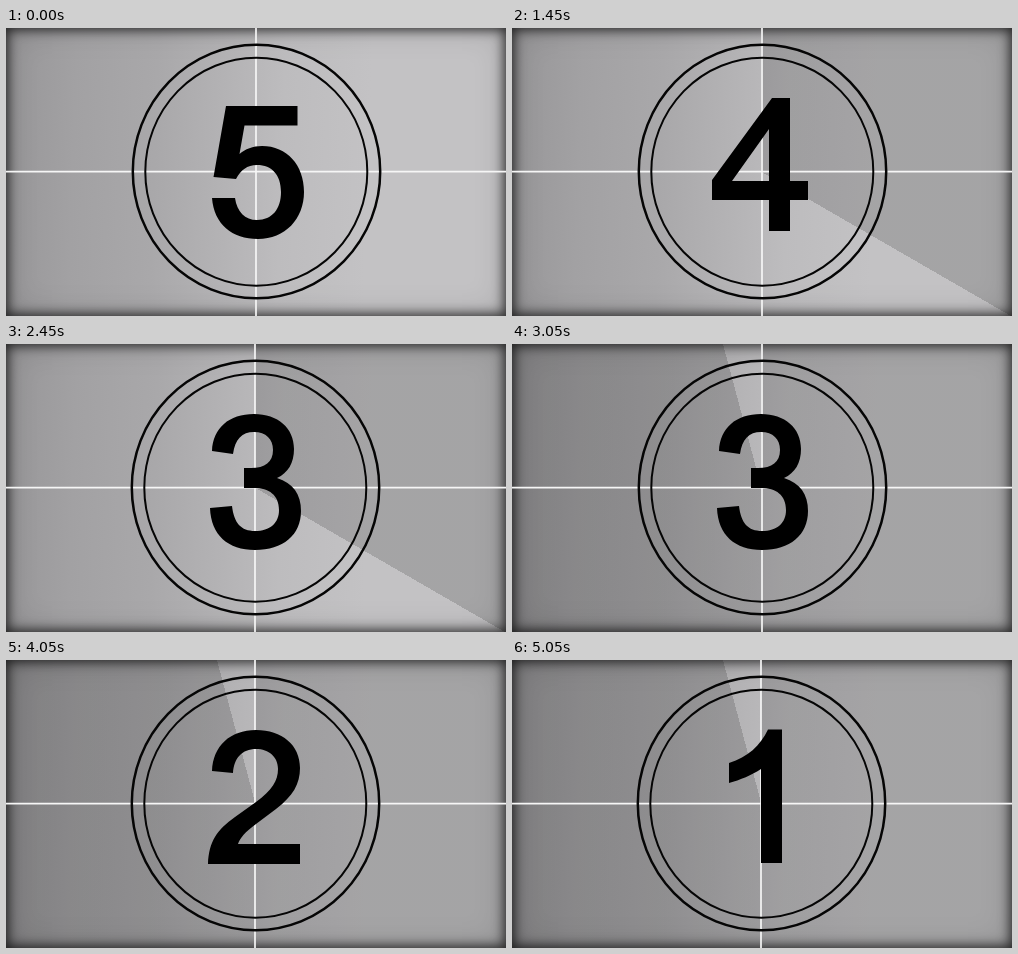
An HTML page that plays this animation: 500 by 288 pixels, repeating every 5.1 s.

```html
<!DOCTYPE html>
<html lang="en">
<head>
<meta charset="utf-8">
<title>Film countdown</title>
<style>
  html, body { margin: 0; width: 100%; height: 100%; overflow: hidden; background: #000; }
  #stage { position: relative; width: 500px; height: 288px; overflow: hidden; }
  #stage > * { position: absolute; inset: 0; }
  .paper {
    background: linear-gradient(92deg, #979698 0, #a2a1a3 14%, #a9a8aa 30%, #b4b3b5 44%, #bdbcbe 55%, #c3c2c4 72%, #c3c2c4 100%);
  }
  .sweep {
    background: conic-gradient(from 0deg at 249.5px 144px, rgba(0, 0, 0, .155) var(--angle, 0deg), transparent 0);
  }
  .vignette {
    box-shadow: inset 0 0 12px 2px rgba(0, 0, 0, .75), inset 0 0 32px rgba(0, 0, 0, .17);
  }
  svg { width: 500px; height: 288px; }
  .ring { fill: none; stroke: #050505; }
  .cross { stroke: #f6f6f6; stroke-width: 1.7; }
</style>
</head>
<body>
<div id="stage">
  <div class="paper"></div>
  <div class="sweep" id="sweep"></div>
  <div class="vignette"></div>
  <svg viewBox="0 0 500 288">
    <path class="cross" d="M0 143.7H500"/>
    <g id="art">
      <path class="cross" d="M250 0V288"/>
      <ellipse class="ring" cx="250.5" cy="143.5" rx="123.7" ry="126.7" stroke-width="2.5"/>
      <ellipse class="ring" cx="250.3" cy="143.7" rx="111" ry="114" stroke-width="2"/>
      <path id="digit" fill="#000" fill-rule="evenodd"/>
    </g>
  </svg>
</div>
<script>
const LOOP = 5100, TICK = 50, FPS = 24, LEAD = 2;

const digits = {
  5: "M220 78H291.5V97.5H238.5L233.5 126C239 121 247 118 256 118C281 118 298 137 298 164C298 191 279 211 252 211C226 211 208 196 206 170H229C231 184 239 192 251 192C266 192 275 181 275 164C275 147 266 137 251 137C241 137 235 142 230 151L207.5 149Z",
  4: "M260 70H278V153H296V172H278V203H257V172H200V152ZM257 101V153H220Z",
  3: "M207 107C208 84 224 70 249 70C273 70 289 84 289 105C289 119 283 129 272 134C288 139 296 150 296 167C296 191 278 206 250 206C223 206 206 191 205 164L227 162C229 179 236 187 250 187C265 187 274 179 274 166C274 151 264 144 249 144H239V124H246C260 124 268 118 268 106C268 95 261 88 249 88C237 88 230 95 228 110Z",
  2: "M207 111C208 86 225 70 251 70C277 70 295 85 295 108C295 124 288 136 271 149L251 164C240 172 235 178 233 184H295V204H203C204 181 212 170 230 157L251 142C267 130 273 121 273 109C273 97 264 89 251 89C237 89 229 98 228 113Z",
  1: "M257 69.5H271V203H250V109C241 115 229 120 218 123V103C237 97 249 86 257 69.5Z"
};

const sweep = document.getElementById("sweep");
const art = document.getElementById("art");
const digit = document.getElementById("digit");

function draw() {
  const time = Math.floor(performance.now() % LOOP / TICK) * TICK;
  const frame = Math.floor(time * FPS / 1000);
  const step = Math.max(0, frame - LEAD);
  const weave = (frame + 9) % 19 < 10 ? 0 : -1;

  sweep.style.setProperty("--angle", step % FPS * 360 / FPS + "deg");
  art.setAttribute("transform", `translate(${weave} 0)`);
  digit.setAttribute("d", digits[5 - Math.floor(step / FPS)]);
  requestAnimationFrame(draw);
}
draw();
</script>
</body>
</html>
```
